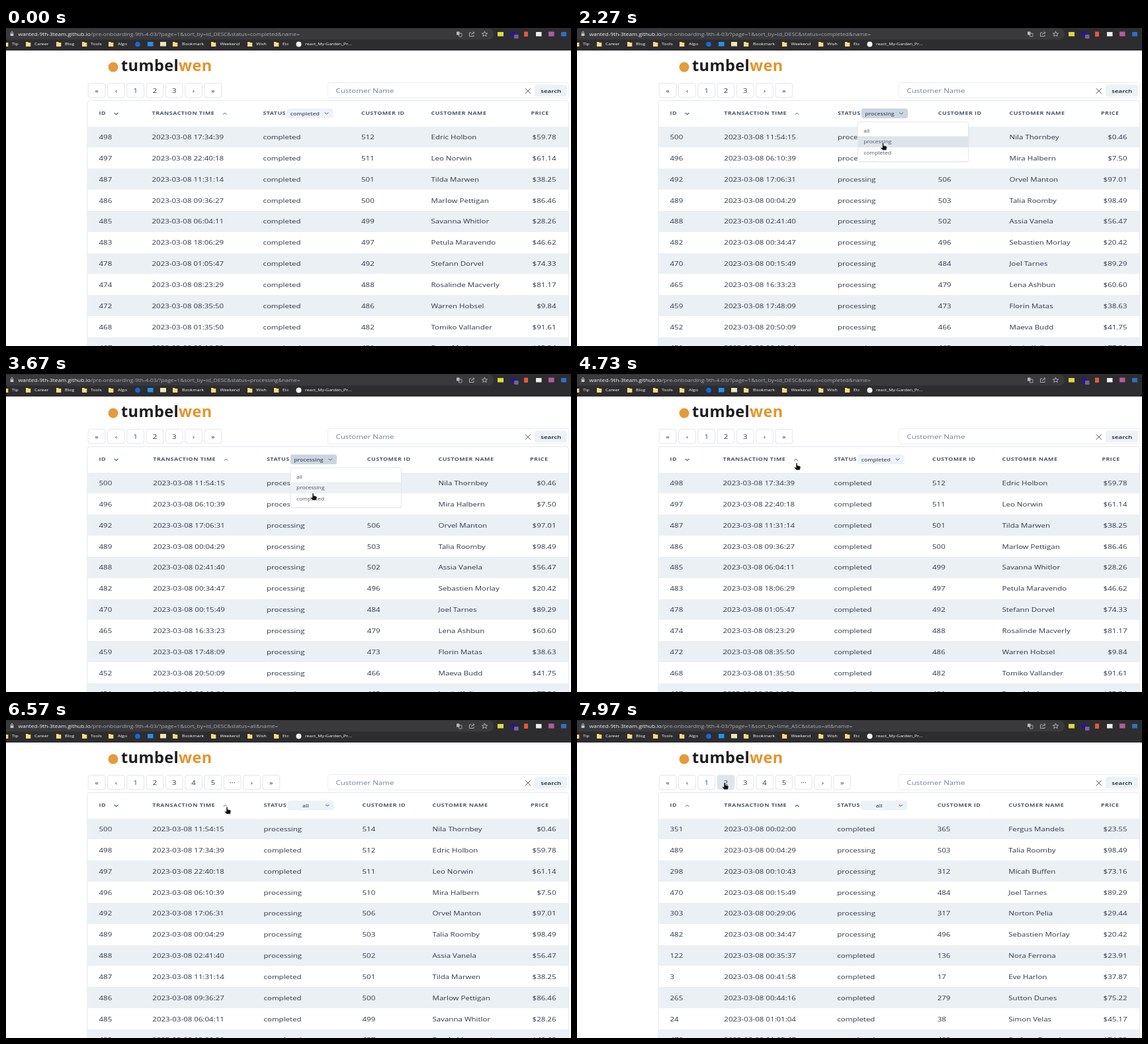
An HTML page that plays this animation: 854 by 480 pixels, repeating every 8000 ms.

```html
<!DOCTYPE html>
<html lang="en">
<head>
<meta charset="utf-8">
<title>Transactions table</title>
<style>
html, body { margin: 0; width: 100%; height: 100%; overflow: hidden; background: #fff; }
svg { display: block; width: 854px; height: 480px; }
text { font-family: "Open Sans", "Noto Sans", sans-serif; white-space: pre; }
.bold { font-weight: 700; }
.semi { font-weight: 600; }
.medium { font-weight: 500; }
.line { fill: none; stroke-width: 1; stroke-linecap: round; stroke-linejoin: round; }
.pill { fill: #edf2f7; }
.over .pill { fill: #cbd5e0; }
.page { fill: #fff; stroke: #dfe5ec; }
.page.on { fill: #dfe5ec; }
</style>
</head>
<body>
<svg id="stage" viewBox="0 0 854 480" xmlns="http://www.w3.org/2000/svg"></svg>
<script>
const LOOP = 8000, ROW = 31.83, TOP = 148.6;
const INK = '#2d3748', HEAD = '#4a5568', EDGE = '#e2e8f0', STRIPE = '#ebf0f5';

const text = (x, y, str, size, fill = INK, cls = '', anchor = 'start', extra = '') =>
  `<text transform="translate(${x} ${y}) scale(1.225 1)" font-size="${size}" fill="${fill}" class="${cls}" text-anchor="${anchor}" ${extra}>${str}</text>`;
const rect = (x, y, w, h, fill, r = 0, extra = '') =>
  `<rect x="${x}" y="${y}" width="${w}" height="${h}" rx="${r}" fill="${fill}" ${extra}/>`;
const line = (d, stroke, extra = '') => `<path class="line" d="${d}" stroke="${stroke}" ${extra}/>`;
const caret = (x, y, up, stroke, w = 1) => {
  const s = up ? -1 : 1;
  return line(`M${x - 2.6} ${y - s}l2.6 ${2 * s}l2.6 ${-2 * s}`, stroke, `style="stroke-width:${w}"`);
};

// id, time, status, name, price
const parse = s => s.trim().split('\n').map(l => {
  const [id, time, st, name, price] = l.split('|');
  return { id: +id, time, status: st === 'c' ? 'completed' : 'processing', name, price };
});
const done = parse(`
498|17:34:39|c|Edric Holbon|59.78
497|22:40:18|c|Leo Norwin|61.14
487|11:31:14|c|Tilda Marwen|38.25
486|09:36:27|c|Marlow Pettigan|86.46
485|06:04:11|c|Savanna Whitlor|28.26
483|18:06:29|c|Petula Maravendo|46.62
478|01:05:47|c|Stefann Dorvel|74.33
474|08:23:29|c|Rosalinde Macverly|81.17
472|08:35:50|c|Warren Hobsel|9.84
468|01:35:50|c|Tomiko Vallander|91.61
467|08:16:52|c|Perry Marlan|65.24`);
const proc = parse(`
500|11:54:15|p|Nila Thornbey|0.46
496|06:10:39|p|Mira Halbern|7.50
492|17:06:31|p|Orvel Manton|97.01
489|00:04:29|p|Talia Roomby|98.49
488|02:41:40|p|Assia Vanela|56.47
482|00:34:47|p|Sebastien Morlay|20.42
470|00:15:49|p|Joel Tarnes|89.29
465|16:33:23|p|Lena Ashbun|60.60
459|17:48:09|p|Florin Matas|38.63
452|20:50:09|p|Maeva Budd|41.75
451|08:13:04|p|Jarvin Kell|77.36`);
const late = parse(`
316|23:53:16|c|Zebulon Mcnarl|23.78
255|23:53:00|p|Florin Woole|51.36
151|23:46:20|p|Ida Bowens|84.11
185|23:41:37|c|Bram Wellond|23.71
263|23:35:18|p|Hazel Dunnington|65.04
100|23:21:51|c|Nils Verrad|13.01
428|23:07:28|c|Celia Brujalto|12.23
439|23:05:12|c|Leopoldan Rudd|40.07
368|23:04:11|c|McArlenna Schnoll|72.56
283|23:03:42|c|Hugh Colvano|74.27
248|22:56:50|c|Kerrin Tabel|4.63`);
const early = parse(`
351|00:02:00|c|Fergus Mandels|23.55
489|00:04:29|p|Talia Roomby|98.49
298|00:10:43|p|Micah Buffen|73.16
470|00:15:49|p|Joel Tarnes|89.29
303|00:29:06|p|Norton Pelia|29.44
482|00:34:47|p|Sebastien Morlay|20.42
122|00:35:37|c|Nora Ferrona|23.91
3|00:41:58|c|Eve Harlon|37.87
265|00:44:16|c|Sutton Dunes|75.22
24|01:01:04|c|Simon Velas|45.17
478|01:05:47|c|Stefann Dorvel|74.33`);
const all = [...done, ...proc].sort((a, b) => b.id - a.id).slice(0, 11);

// cols: time, status, customer id, customer name, price heading
const views = {
  done: { rows: done, cols: [220.5, 388.4, 537, 642.5, 793.4], sort: 'id_DESC', status: 'completed' },
  proc: { rows: proc, cols: [222.3, 394, 545.8, 653.5, 792], sort: 'id_DESC', status: 'processing' },
  all: { rows: all, cols: [221.3, 389.5, 538.5, 644.5, 793], sort: 'id_DESC', status: 'all' },
  late: { rows: late, cols: [221.3, 389.5, 538.5, 644.5, 793], sort: 'time_DESC', status: 'all' },
  early: { rows: early, cols: [222.3, 393.3, 544.7, 652.3, 792], sort: 'time_ASC', status: 'all' }
};
const tableAt = [[0, 'done'], [2270, 'proc'], [3870, 'done'], [6000, 'all'], [6600, 'late'], [7460, 'early']];
const urlAt = [[0, 'done'], [2300, 'proc'], [3900, 'done'], [6030, 'all'], [6600, 'late'], [7460, 'early']];
const menus = [[1470, 2300, 424.2], [3240, 3900, 430], [5130, 6030, 424.2]];
const options = ['all', 'processing', 'completed'];
const optionY = i => 155 + 16.8 * i;

// pointer: time, x, y
const track = [
  [170, 45, 186], [970, 460, 128], [1500, 460, 128], [2150, 462.5, 173], [2300, 462.5, 173.5],
  [2470, 464, 172], [2670, 464, 172], [2830, 466, 139], [2970, 466, 139], [3100, 465, 130],
  [3330, 465, 130], [3670, 464, 179.6], [3770, 465, 187], [3900, 465, 187], [4670, 332, 134],
  [4730, 332, 134], [5000, 458, 130], [5200, 458, 130], [5500, 454, 150], [5670, 455, 151],
  [6000, 455, 151], [6330, 334, 131], [6570, 334, 131], [7130, 337, 128], [7460, 337, 128],
  [7930, 223, 94]];

function browser() {
  let s = rect(0, 0, 854, 34, '#2d2d30') + rect(-10, 0.5, 747, 17, '#3a3a3d', 8);
  s += rect(6.6, 8.2, 4.8, 3.8, '#c4c7cb', .6) + line('M7.6 8V7.2a1.4 1.6 0 0 1 2.8 0V8', '#c4c7cb');
  s += text(18.5, 11.7, '<tspan fill="#f1f3f4">wanted-9th-3team.github.io</tspan><tspan id="path"></tspan>', 6.87, '#a6abb1');
  const grey = '#b8bbbf';
  s += rect(681, 5.5, 4.5, 5, grey, .5) + rect(684.5, 8, 4.5, 5, 'none', .5, `stroke="${grey}" stroke-width=".8"`);
  s += line('M703 7h-2.5v5.5h6.5v-2M703.5 10q.5-3 4-3m-1.5-1.6l1.8 1.6l-1.8 1.6', grey, 'style="stroke-width:.9"');
  s += line('M723.5 5.3l1.2 2.6 3 .2-2.3 1.8.8 2.6-2.7-1.5-2.7 1.5.8-2.6-2.3-1.8 3-.2z', grey, 'style="stroke-width:.9"');
  s += rect(743, 6, 9, 6.5, '#d8dd3c') + rect(762, 5.5, 8, 7, '#29168c') + rect(768, 10, 6.5, 6, '#74629b', 1);
  s += rect(783, 5.5, 6, 7.5, '#e2593b') + rect(801, 6, 8.5, 6.5, '#ececec') + rect(820, 5.5, 8.5, 7, '#b45aa0') + rect(839, 6, 8, 6.5, '#2e6fc4');
  const marks = [[-4, 'Tip', 9], [30, 'Career', 43], [76, 'Blog', 89], [115, 'Tools', 128], [155, 'Algo', 169],
    [252, 'Bookmark', 266], [310, 'Weekend', 323.5], [365, 'Wish', 378], [405, 'Etc', 418]];
  for (const [x, label, tx] of marks)
    s += `<path d="M${x} 21h3l1 1h3.3v6H${x}z" fill="#f9dc7c"/>` + text(tx, 26.4, label, 5.65, '#fff');
  s += '<circle cx="199" cy="24.5" r="3.8" fill="#1269e0"/>' + rect(214, 21, 8.5, 6.5, '#2492ee') + rect(233, 21, 9, 6.5, '#eee9b5');
  s += '<circle cx="442.5" cy="24.5" r="4" fill="#f4f4f4"/>' + text(452, 26.4, 'react_My-Garden_Pr...', 5.65, '#fff');
  return s;
}

function toolbar() {
  let s = '<circle cx="162" cy="59" r="7.5" fill="#e59a3c"/>';
  s += '<text x="174" y="65" font-size="23.5" class="bold" letter-spacing=".4" fill="#1c1c1e">tumbel<tspan fill="#e4942b">wen</tspan></text>';
  s += rect(486.5, 82.5, 364, 23, '#fff', 3, 'stroke="#e9eef3"') + text(498.5, 98.2, 'Customer Name', 9.4, '#718096');
  s += line('M785 91.4l7.6 7.4m0-7.4l-7.6 7.4', HEAD);
  s += rect(799, 85.5, 49, 18, '#edf2f7', 3.5) + text(823.7, 97.8, 'search', 7.9, '#1a202c', 'semi', 'middle');
  return s + rect(122.8, 109.6, 727.7, 400, '#fff', 4, `stroke="${EDGE}"`);
}

const pageX = i => 124.2 + 29.3 * i;
function table(key) {
  const { rows, cols, sort, status } = views[key];
  const [time, stat, cust, name, price] = cols;
  const pages = status === 'all' ? '«‹12345⋯›»' : '«‹123›»';
  let s = '';
  [...pages].forEach((c, i) => {
    const x = pageX(i);
    s += rect(x, 83.3, 25.8, 21.6, '#fff', 3.5, 'class="page"');
    s += c === '⋯'
      ? [-3, 0, 3].map(d => `<circle cx="${x + 13 + d}" cy="94.5" r=".75" fill="${HEAD}"/>`).join('')
      : text(x + 12.9, 98, c, 9.3, c === '1' ? '#2c5282' : INK, 'medium', 'middle');
  });
  const head = (x, label, y = 130.8) => text(x, y, label, 7.3, HEAD, 'bold', 'start', 'letter-spacing=".37"');
  s += head(140.5, 'ID') + head(time, 'TRANSACTION TIME') + head(stat, 'STATUS');
  s += head(cust, 'CUSTOMER ID', 131.3) + head(name, 'CUSTOMER NAME', 131.3) + head(price, 'PRICE', 131.3);
  const arrow = (x, field) => {
    const on = sort.startsWith(field);
    return caret(x, 129.4, !(on && sort.endsWith('DESC')), on ? '#2c6f8c' : HEAD, on ? 1.2 : .9);
  };
  s += arrow(166.6, 'id') + arrow(time + 110.3, 'time');
  const px = stat + 35.8;
  s += `<rect class="pill" x="${px}" y="121.6" width="70.3" height="14.6" rx="3.5"/>`;
  s += text(px + 27.6, 131.6, status, 7.05, HEAD, 'semi', 'middle') + caret(px + 60.4, 129, false, HEAD, .9);
  rows.forEach((r, i) => {
    const y = TOP + ROW * i, base = (y + 19.5).toFixed(2), edge = Math.round(y);
    if (i % 2 === 0) s += rect(123.3, edge, 726.7, Math.round(y + ROW) - edge, STRIPE);
    const cell = (x, v, a) => text(x, base, v, 9.4, INK, '', a);
    s += cell(140.5, r.id) + cell(time, '2023-03-08 ' + r.time) + cell(stat, r.status) +
      cell(cust, r.id + 14) + cell(name, r.name) + cell(831.5, '$' + r.price, 'end');
  });
  return `<g id="${key}">${s}</g>`;
}

function menu() {
  let s = rect(0.8, 143, 167.4, 60, '#000', 3, 'opacity=".05"') + rect(0, 141.6, 167.4, 60, '#fff', 3, `stroke="${EDGE}"`);
  options.forEach((o, i) => {
    s += rect(0.5, optionY(i) - 8.4, 166.4, 16.8, '#dfe4ec', 0, 'class="option"') + text(9, optionY(i) + 2.6, o, 6.9, HEAD);
  });
  return `<g id="menu">${s}</g>`;
}

const pointer = `<g id="pointer" fill="#111" stroke="#fff" stroke-width=".5">
<path id="hand" d="M-1 .8Q0 -.5 1 .8V4L4.5 4.8Q6 5.2 6 6.6L5 11H-.3L-3.6 7.6Q-3.4 6-1 7.2Z"/>
<path id="arrow" d="M0 0V9.6L2.6 7.6L4.2 11L5.8 10.4L4.3 7.1H7.6Z"/></g>`;

const stage = document.getElementById('stage');
stage.innerHTML = browser() + toolbar() + Object.keys(views).map(table).join('') + menu() + pointer;
const $ = id => document.getElementById(id);
const groups = Object.fromEntries(Object.keys(views).map(k => [k, $(k)]));
const bars = [...document.querySelectorAll('.option')];
const show = (el, on) => el.setAttribute('visibility', on ? 'visible' : 'hidden');
const pick = (list, t) => list.filter(e => e[0] <= t).pop()[1];
const clamp = v => Math.max(0, Math.min(1, v));

function pointerAt(t) {
  const i = track.findIndex(k => k[0] > t);
  if (i < 0) return track[track.length - 1].slice(1);
  if (i === 0) return null;
  const [t0, x0, y0] = track[i - 1], [t1, x1, y1] = track[i];
  const u = (t - t0) / (t1 - t0), e = u * u * (3 - 2 * u);
  return [x0 + (x1 - x0) * e, y0 + (y1 - y0) * e];
}

function draw(t) {
  const key = pick(tableAt, t), view = views[key], linked = views[pick(urlAt, t)];
  for (const k in groups) show(groups[k], k === key);
  $('path').textContent = `/pre-onboarding-9th-4-03/?page=1&sort_by=${linked.sort}&status=${linked.status}&name=`;

  const pos = pointerAt(t), [x, y] = pos || [-50, -50];
  const open = menus.find(m => t >= m[0] && t < m[1]);
  const pillX = view.cols[1] + 35.8;
  const onPill = x > pillX && x < pillX + 70.3 && y > 121 && y < 136.5;
  groups[key].classList.toggle('over', !!open || onPill);

  let onPage = false;
  groups[key].querySelectorAll('.page').forEach((p, i) => {
    const on = x > pageX(i) && x < pageX(i) + 25.8 && y > 83 && y < 105;
    p.classList.toggle('on', on);
    onPage = onPage || on;
  });

  show($('menu'), open);
  if (open) {
    $('menu').setAttribute('transform', `translate(${open[2]} 0)`);
    bars.forEach((b, i) => {
      const near = clamp((8.9 - Math.abs(y - optionY(i))) / 2);
      b.setAttribute('opacity', y < 146 ? +(options[i] === view.status) : near);
    });
  }

  const onSort = x > 324 && x < 346 && y > 118 && y < 140;
  const hand = open || onPill || onPage || onSort;
  show($('hand'), pos && hand);
  show($('arrow'), pos && !hand);
  $('pointer').setAttribute('transform', `translate(${x.toFixed(2)} ${y.toFixed(2)})`);
}

const start = performance.now();
function tick() {
  draw((performance.now() - start) % LOOP);
  requestAnimationFrame(tick);
}
tick();
</script>
</body>
</html>
```
